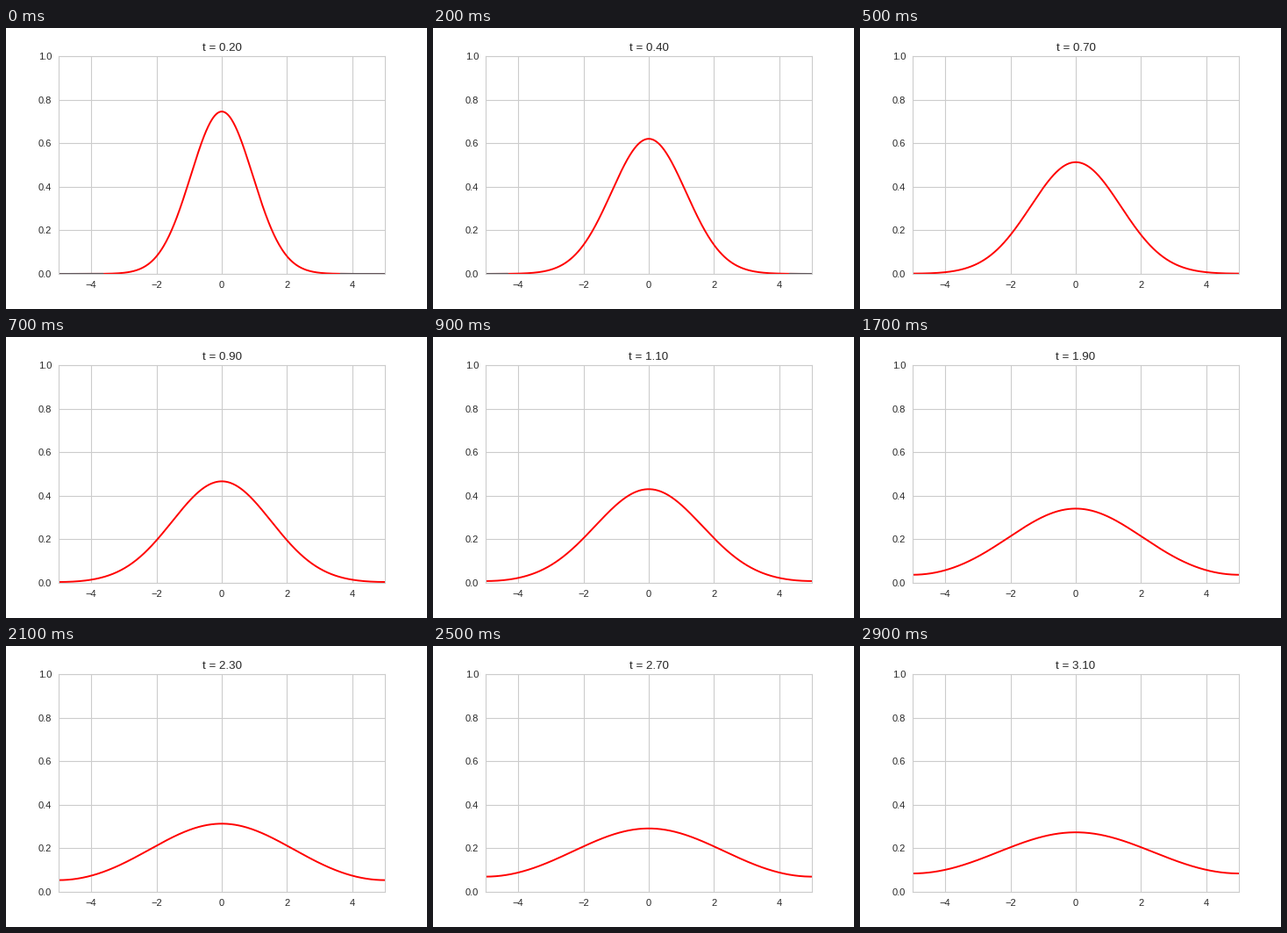
A matplotlib script that plays this animation: 480x320 px, repeating every 3 s.

```python
import numpy as np
import matplotlib.pyplot as plt
from matplotlib.animation import FuncAnimation

FRAMES = 30
INTERVAL = 100
START, STEP = 0.2, 0.1
PERIOD = 10
FLAT = 5e-4  # below this the tail merges with the dark baseline

plt.rcParams.update({
    "font.family": "Liberation Sans",
    "text.color": "0.15",
    "axes.edgecolor": "0.8",
    "axes.linewidth": 1,
    "axes.axisbelow": True,
    "axes.grid": True,
    "axes.titlesize": 12,
    "axes.titlepad": 5,
    "grid.color": "0.8",
    "grid.linewidth": 1,
    "grid.linestyle": "-",
    "lines.linewidth": 1.75,
    "lines.solid_capstyle": "round",
})


def heat(x, t):
    """Spreading Gaussian on a periodic interval, summed over its images."""
    spread = 1 + 4 * t
    images = (np.exp(-(x - PERIOD * k) ** 2 / spread) for k in range(-2, 3))
    return sum(images) / np.sqrt(spread)


fig = plt.figure(figsize=(6, 4), dpi=80, facecolor="white")
ax = fig.add_axes([0.125, 0.125, 0.775, 0.775])
ax.set_xlim(-5, 5)
ax.set_ylim(0, 1)
ax.set_xticks(range(-4, 5, 2))
ax.set_yticks(np.linspace(0, 1, 6))
ax.tick_params(length=0, pad=7, labelsize=10, labelcolor="0.15")

x = np.linspace(-5, 5, 501)
curve, = ax.plot([], [], color="red")
tail, = ax.plot([], [], color="#5a5055")
title = ax.set_title("")


def draw(i):
    t = START + STEP * i
    u = heat(x, t)
    curve.set_data(x, u)
    tail.set_data(x, np.where(u < FLAT, u, np.nan))
    title.set_text(f"t = {t:.2f}")
    return curve, tail, title


anim = FuncAnimation(fig, draw, frames=FRAMES, interval=INTERVAL,
                     init_func=lambda: draw(0), repeat=True, repeat_delay=0)
plt.show()
```
